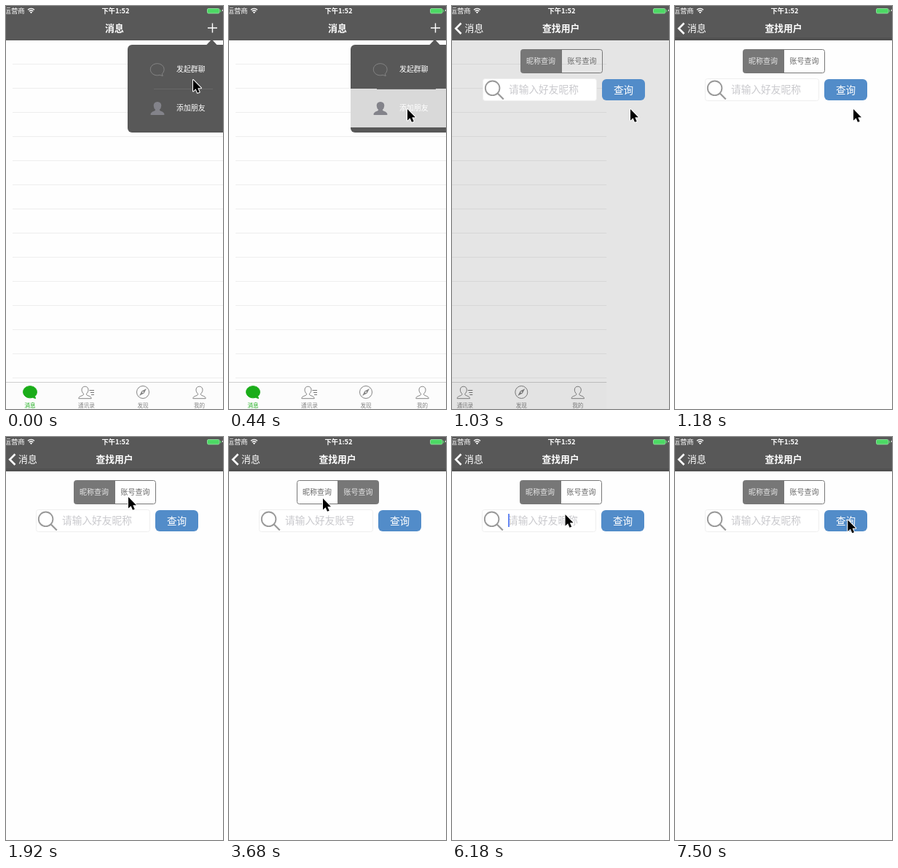
An HTML page for the animation above (8 s loop, 298 by 551 pixels).

```html
<!DOCTYPE html>
<html lang="zh">
<head>
<meta charset="utf-8">
<style>
  html, body { margin: 0; width: 100%; height: 100%; overflow: hidden; background: #fefefe; }
  svg { display: block; width: 100%; height: 100%; }
  text { font-family: "Noto Sans CJK SC", "Noto Sans CJK", sans-serif; }
</style>
</head>
<body>
<svg id="stage" viewBox="0 0 298 551" preserveAspectRatio="none"></svg>
<script>
const LOOP = 8000;
const HOLD = 147.1;      // the picture advances in even steps
const LAST_STEP = 51;
const WIDTH = 310;       // width of a page
const stage = document.getElementById('stage');

// Text whose glyphs are vertically centred on cy
const label = (x, cy, size, str, fill = '#fff', extra = '') =>
  `<text x="${x}" y="${cy + size * 0.38}" font-size="${size}" fill="${fill}" ${extra}>${str}</text>`;
const mid = 'text-anchor="middle"';
const bold = 'font-weight="600"';
const gray = '#858585';
const line = `fill="none" stroke="${gray}"`;

const person = (x, y, paint) =>
  `<path transform="translate(${x} ${y})" ${paint} stroke-linejoin="round" d="M0-8.3C-3-8.3-4.6-6.2-4.5-3.5
   C-4.4-1.2-3.3.5-2 1.6C-1.6 3-2.5 3.7-4.5 4.4C-7.2 5.3-8.6 6-8.7 8.2H8.7C8.6 6 7.2 5.3 4.5 4.4
   C2.5 3.7 1.6 3 2 1.6C3.3.5 4.4-1.2 4.5-3.5C4.6-6.2 3-8.3 0-8.3Z"/>`;

const bubble = (x, y, paint) =>
  `<path transform="translate(${x} ${y})" ${paint} d="M0-8.3C5.4-8.3 9.4-4.7 9.4-.3C9.4 2.3 8.3 4.2 6.6 5.7
   L7.6 8.6L3.6 7.3C-3.6 9.4-9.4 5-9.4-.3C-9.4-4.7-5.4-8.3 0-8.3Z"/>`;

function rows() {
  let d = '';
  for (let y = 79.5; y < 514; y += 33) d += `M9 ${y}H305`;
  return `<path d="${d}" stroke="#eee"/>`;
}

const tabNames = ['消息', '通讯录', '发现', '我的'].map((name, i) =>
  label(33 + 77.5 * i, 546, 7.6, name, i ? gray : '#1aad19', mid)).join('');

const tabs = `
  <rect x="-6" y="514" width="311" height="43" fill="#fcfcfc"/>
  <path d="M-6 514.5H305" stroke="#cfcfcf"/>
  ${bubble(33, 528, 'fill="#1aad19" stroke="#1aad19"')}
  ${person(108.5, 528.5, line)}
  <path d="M114.5 525.5H121M116 528.5H121M117 531.5H121" stroke="#777" stroke-width="1.2"/>
  <circle cx="188" cy="528" r="8.5" ${line}/>
  <path d="M193 523L189.6 529.6L183 533L186.4 526.4Z" fill="${gray}"/>
  <circle cx="188" cy="528" r="1" fill="#fff"/>
  ${person(265.5, 528.5, line)}
  ${tabNames}`;

const menu = `
  <path d="M282.5 45.5L290 53.5H275Z" fill="#585858"/>
  <rect x="167" y="53" width="138" height="120" rx="6" fill="#585858"/>
  <g id="items">
    <rect id="press" x="167" y="113" width="138" height="53" fill="#d9d9d9"/>
    <path d="M203 113.5H284" stroke="#686868"/>
    ${bubble(207.7, 87, `fill="none" stroke="${gray}"`)}
    ${person(208, 140, 'fill="#83838a" stroke="#83838a" stroke-width="1.6"')}
    ${label(234, 86.5, 9.9, '发起群聊')}
    ${label(234, 139.5, 9.9, '添加朋友')}
  </g>`;

const search = `
  <rect x="41.5" y="99.5" width="156" height="30" rx="3" fill="#fff" stroke="#efefef"/>
  <circle cx="54.6" cy="112.3" r="9.8" fill="none" stroke="#999" stroke-width="1.9"/>
  <path d="M61.8 119.5L69.8 127.5" stroke="#999" stroke-width="2.2"/>
  ${label(77, 114, 13.7, '请输入好友昵称', '#c9c9cd', 'id="hint"')}
  <rect id="caret" x="77.2" y="105" width="1.6" height="18" fill="#426bf2"/>
  <rect x="205" y="100" width="59" height="29" rx="6" fill="#528cc9"/>
  ${label(234.5, 114.5, 13.6, '查询', '#fff', mid)}
  <path id="segL" d="M149.5 59.5H96.5a3 3 0 0 0-3 3V88.5a3 3 0 0 0 3 3H149.5Z" fill="#777"/>
  <path id="segR" d="M149.5 59.5H202.5a3 3 0 0 1 3 3V88.5a3 3 0 0 1-3 3H149.5Z" fill="#777"/>
  <rect x="93.5" y="59.5" width="112" height="32" rx="3" fill="none" stroke="#777"/>
  <path d="M149.5 59.5V91.5" stroke="#777"/>
  ${label(121, 75.5, 10, '昵称查询', '#fff', mid + ' id="txtL"')}
  ${label(177.5, 75.5, 10, '账号查询', '#fff', mid + ' id="txtR"')}`;

const status = `
  ${label(-2.5, 6.5, 9.4, '运营商')}
  <path d="M30 5.2Q34.5 1.4 39 5.2M31.7 7.2Q34.5 4.8 37.3 7.2" fill="none" stroke="#fff" stroke-width="1.3"/>
  <path d="M32.9 8.4Q34.5 7.2 36.1 8.4L34.5 10.2Z" fill="#fff"/>
  ${label(150.5, 6.5, 9.3, '下午1:52', '#fff', `${mid} ${bold}`)}
  <rect x="276.5" y="3.5" width="16.5" height="6.5" rx="1.5" fill="#4cd964" stroke="#8fd69c"/>
  <path d="M294.8 5.2V8.3" stroke="#4cd964" stroke-width="1.2"/>
  <path d="M298 4L296.6 7H298Z" fill="#fff"/>`;

stage.innerHTML = `
  <rect width="298" height="551" fill="#fefefe"/>
  <g id="list">${rows()}${tabs}</g>
  <rect id="dim" y="47" width="298" height="504"/>
  <rect id="shade" x="-9.5" y="47" width="3" height="504"/>
  <rect width="298" height="47" fill="#585858"/>
  <rect id="strip" y="43" width="298" height="4" fill="#505050"/>
  <g id="menu">${menu}</g>
  <g id="search">${search}</g>
  ${status}
  <path id="back" d="M12.5 23.5L5.2 30.7L12.5 38" fill="none" stroke="#fff" stroke-width="2.6"/>
  ${label(0, 30.5, 12.9, '消息', '#fff', mid + ' id="oldTitle"')}
  ${label(0, 30.5, 12.8, '查找用户', '#fff', `${mid} ${bold} id="newTitle"`)}
  <path id="plus" d="M277 30H290M283.5 23.5V36.5" stroke="#fff" stroke-width="1.4"/>
  <path id="cursor" d="M0 0V15.5L3.6 12.2L6 17.8L8.7 16.7L6.3 11.2H11Z" stroke="#fff" stroke-width="2"
    paint-order="stroke" stroke-linejoin="round"/>`;

const el = {};
stage.querySelectorAll('[id]').forEach(n => el[n.id] = n);

// Stops of the pointer: time, x, y
const stops = [
  [0, 257, 101], [147, 245, 141], [1180, 245, 141], [1900, 168, 82], [2200, 171, 78],
  [3530, 171, 78], [3670, 129, 84], [4260, 120, 79], [4700, 112.5, 108], [5300, 112.5, 108],
  [6765, 179, 105], [7210, 232, 135], [7500, 237.3, 113.5]
];

function pointer(t) {
  const i = stops.findIndex(s => s[0] > t);
  if (i < 0) return stops.at(-1).slice(1);
  const [t0, x0, y0] = stops[i - 1], [t1, x1, y1] = stops[i];
  const u = (t - t0) / (t1 - t0), e = u * u * (3 - 2 * u);
  return [x0 + (x1 - x0) * e, y0 + (y1 - y0) * e];
}

const show = (n, a) => n.setAttribute('opacity', +a);
const move = (n, x, y = 0) => n.setAttribute('transform', `translate(${x} ${y})`);

function draw(time) {
  const t = HOLD * Math.min(LAST_STEP, Math.floor((time + 10) / HOLD));
  const before = t < 668, after = t > 1100, sliding = !before && !after;

  // Distance of the incoming page from its resting place
  const off = before ? WIDTH : Math.round(WIDTH * Math.exp((668 - t) / 63));
  const p = 1 - off / WIDTH;
  const q = Math.min(1, off / 107);
  const shift = -93 * p;

  move(el.list, shift);
  show(el.list, !after);
  show(el.dim, after ? 0 : 0.1 * p);
  move(el.shade, off);
  show(el.shade, sliding ? 0.06 : 0);
  show(el.strip, after);

  // The menu shrinks toward the tip of its arrow
  const s = before ? 1 : 0.3 * q;
  el.menu.setAttribute('transform', `translate(${282 + shift} 45) scale(${s}) translate(-282 -45)`);
  show(el.menu, before || 0.34 * q);
  show(el.items, before);
  show(el.press, t >= 440);

  move(el.search, off);
  show(el.search, !before);
  show(el.back, before ? 0 : 1 - 0.85 * q);
  move(el.oldTitle, before ? 149 : 30 + 0.43 * off);
  el.oldTitle.setAttribute('font-weight', before ? 600 : 400);
  show(el.oldTitle, before || 1 - 0.25 * q);
  move(el.newTitle, 149 + 0.66 * off);
  show(el.newTitle, before ? 0 : 1 - 0.25 * q);
  show(el.plus, before || 0.2 * q * q);

  const account = t > 2300 && t < 4100;
  show(el.segL, !account);
  show(el.segR, account);
  el.txtL.setAttribute('fill', account ? '#666' : '#e6e6e6');
  el.txtR.setAttribute('fill', account ? '#e6e6e6' : '#666');
  el.hint.textContent = account ? '请输入好友账号' : '请输入好友昵称';
  show(el.caret, t > 5140 && (t - 5140) % 960 < 430);

  move(el.cursor, ...pointer(t));
}

const start = performance.now();
function tick() {
  draw((performance.now() - start) % LOOP);
  requestAnimationFrame(tick);
}
tick();
</script>
</body>
</html>
```
